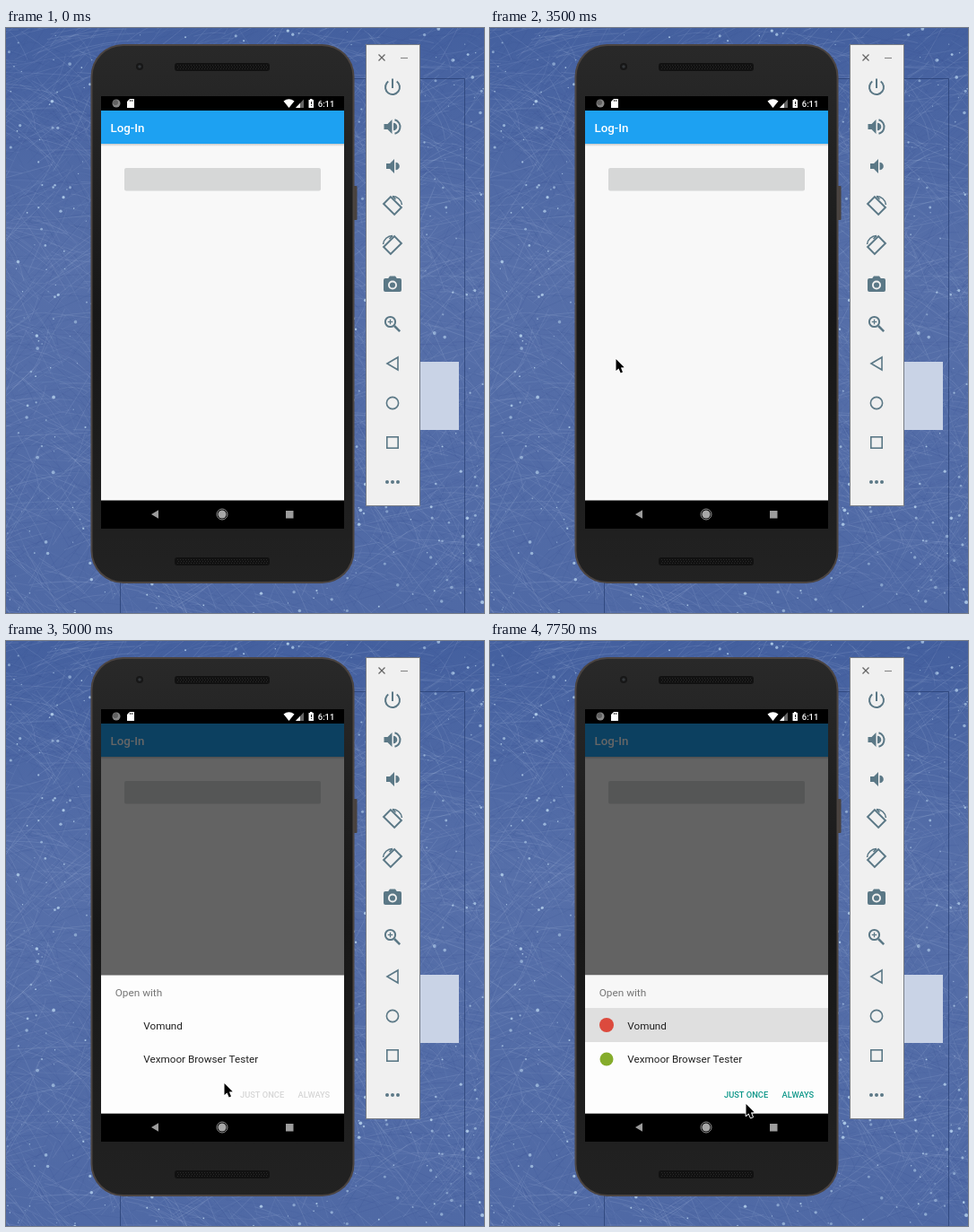
An HTML page with a canvas for the animation above (8000 ms loop, 533 by 652 pixels).

```html
<!DOCTYPE html>
<html lang="en">
<head>
<meta charset="utf-8">
<title>Log-In</title>
<style>
html, body { margin: 0; width: 100%; height: 100%; overflow: hidden; background: #5670a8; }
canvas { display: block; width: 533px; height: 652px; }
</style>
</head>
<body>
<canvas id="stage" width="533" height="652"></canvas>
<script>
const W = 533, H = 652, LOOP = 8000, TAU = Math.PI * 2;
const ctx = document.getElementById('stage').getContext('2d');
const backdrop = document.createElement('canvas');
backdrop.width = W;
backdrop.height = H;

// [start ms, x, y] of the pointer tip; it jumps from place to place
const pointerStops = [
  [500, 285, 131], [750, 250, 150], [1000, 222, 166],
  [1750, 227, 230], [2000, 238, 278], [2250, 243, 245], [2500, 238, 195], [2750, 237, 172],
  [3000, 210, 230], [3250, 160, 335], [3500, 140, 369],
  [4000, 152, 400], [4250, 168, 432], [4500, 174, 444], [4750, 408, 304], [5000, 243, 493],
  [5250, 275, 440], [5500, 225, 438], [5750, 190, 440],
  [6500, 186, 438], [6750, 180, 435], [7000, 177, 434], [7500, 200, 452], [7750, 285, 516]
];

function seeded(seed) {
  return () => {
    seed = (seed * 1664525 + 1013904223) >>> 0;
    return seed / 4294967296;
  };
}

function box(c, x, y, w, h, color) {
  c.fillStyle = color;
  c.fillRect(x, y, w, h);
}

function rounded(c, x, y, w, h, r, color) {
  c.beginPath();
  c.roundRect(x, y, w, h, r);
  c.fillStyle = color;
  c.fill();
}

function disc(c, x, y, r, color) {
  c.beginPath();
  c.arc(x, y, r, 0, TAU);
  c.fillStyle = color;
  c.fill();
}

function arc(c, x, y, r, from, to) {
  c.beginPath();
  c.arc(x, y, r, from * Math.PI, to * Math.PI);
  c.stroke();
}

function line(c, x1, y1, x2, y2) {
  c.beginPath();
  c.moveTo(x1, y1);
  c.lineTo(x2, y2);
  c.stroke();
}

function shape(c, points) {
  c.beginPath();
  points.forEach(([x, y]) => c.lineTo(x, y));
  c.closePath();
}

function fillShape(c, color, ...points) {
  shape(c, points);
  c.fillStyle = color;
  c.fill();
}

function label(c, text, x, y, size, color, weight = 400) {
  c.font = `${weight} ${size}px Roboto, sans-serif`;
  c.fillStyle = color;
  c.fillText(text, x, y);
}

function drawWallpaper(c) {
  const rnd = seeded(77);
  const base = c.createLinearGradient(0, 0, 0, H);
  base.addColorStop(0, '#44609f');
  base.addColorStop(0.4, '#566fa9');
  base.addColorStop(1, '#4f69a5');
  box(c, 0, 0, W, H, base);

  c.lineWidth = 0.7;
  for (let i = 0; i < 3600; i++) {
    const x = rnd() * (W + 80) - 80, y = rnd() * H;
    const angle = (rnd() - 0.5) * 2.4, length = 25 + rnd() * 85;
    const dx = Math.cos(angle) * length, dy = Math.sin(angle) * length;
    const alpha = 0.08 + rnd() * 0.25;
    c.strokeStyle = rnd() < 0.65 ? `rgba(155,174,211,${alpha})` : `rgba(58,82,146,${alpha})`;
    c.beginPath();
    c.moveTo(x, y);
    c.quadraticCurveTo(x + dx / 2 + rnd() * 8, y + dy / 2 - rnd() * 8, x + dx, y + dy);
    c.stroke();
  }
  for (let i = 0; i < 620; i++) {
    const x = rnd() * W, y = rnd() * H, size = 0.6 + rnd() ** 2 * 1.4;
    disc(c, x, y, size, `rgba(183,211,238,${0.5 + rnd() * 0.4})`);
  }

  box(c, 429, 372, 76, 76, '#c9d3e6');
  c.strokeStyle = 'rgba(35,57,110,.65)';
  c.lineWidth = 1;
  c.strokeRect(127.5, 56.5, 384, 700);
}

function drawSpeaker(c, y) {
  rounded(c, 188, y, 106, 9, 3, '#111');
  for (let row = 0; row < 3; row++) {
    for (let x = 191; x < 292; x += 3) box(c, x + row % 2, y + 2 + row * 2, 1, 1, '#292929');
  }
}

function drawPhone(c) {
  rounded(c, 387, 176, 4.5, 38, 1, '#49423f');
  rounded(c, 94.5, 18, 294, 601, 36, '#4b4441');
  const body = c.createLinearGradient(0, 18, 0, 619);
  body.addColorStop(0, '#292929');
  body.addColorStop(0.5, '#171717');
  body.addColorStop(1, '#222');
  rounded(c, 96.5, 20, 290, 597, 34, body);
  drawSpeaker(c, 39);
  drawSpeaker(c, 590);
  disc(c, 149, 43, 4, '#171717');
  disc(c, 149, 43, 1.8, '#34383b');

  box(c, 106, 76, 271, 482, '#000');
  disc(c, 123, 84, 4.5, '#888');
  disc(c, 122, 83, 3, '#626262');
  fillShape(c, '#fff', [135, 82], [138, 79], [143, 79], [143, 89], [135, 89]);
  [138, 140].forEach(x => box(c, x, 80, 1, 2, '#333'));

  c.beginPath();
  c.moveTo(315.5, 89);
  c.lineTo(309.5, 81.5);
  c.quadraticCurveTo(315.5, 77, 321.5, 81.5);
  c.fillStyle = '#fff';
  c.fill();
  fillShape(c, '#666', [323, 89], [332, 79.5], [332, 89]);
  fillShape(c, '#fff', [323, 89], [328, 83.7], [328, 89]);
  rounded(c, 337.5, 80, 5.5, 9, 0.5, '#fff');
  box(c, 339, 79, 2.5, 1, '#fff');
  box(c, 340, 82, 1, 3, '#222');
  box(c, 340, 86, 1, 1, '#222');
  label(c, '6:11', 347.8, 87.5, 9.4, '#fff', 500);

  fillShape(c, '#9c9c9c', [162, 542], [170, 537.3], [170, 546.7]);
  disc(c, 241, 542, 4.6, '#a7a7a7');
  c.strokeStyle = '#909090';
  c.lineWidth = 1;
  arc(c, 241, 542, 6, 0, 2);
  box(c, 312, 538, 8.5, 8.5, '#9c9c9c');
}

const slate = '#5b7886';

function speakerIcon(c, x) {
  fillShape(c, slate, [x, -3], [x + 4, -3], [x + 9, -8], [x + 9, 8], [x + 4, 3], [x, 3]);
  c.beginPath();
  c.arc(x + 10.5, 0, 4.3, -Math.PI / 2, Math.PI / 2);
  c.fill();
}

function rotateIcon(c, flip) {
  c.scale(flip, 1);
  c.save();
  c.rotate(Math.PI / 4);
  c.strokeRect(-8.5, -5.5, 17, 11);
  c.restore();
  c.lineWidth = 1.6;
  arc(c, 0, 0, 10.5, -0.5, -0.03);
  line(c, 0, -10.5, 3.5, -7);
}

const toolIcons = [
  [66, c => { arc(c, 0, 0, 8, -0.3, 1.3); line(c, 0, -9.5, 0, 1); }],
  [110, c => { speakerIcon(c, -9.5); arc(c, 0.5, 0, 8, -0.42, 0.42); }],
  [154, c => speakerIcon(c, -7)],
  [198, c => rotateIcon(c, 1)],
  [242, c => rotateIcon(c, -1)],
  [286, c => {
    rounded(c, -10, -7, 20, 15, 2, slate);
    fillShape(c, slate, [-5.5, -6], [-3, -9.5], [3, -9.5], [5.5, -6]);
    disc(c, 0, 0.5, 5, '#f0f0f0');
    disc(c, 0, 0.5, 3.1, slate);
  }],
  [330, c => {
    arc(c, -2.5, -2.5, 5.6, 0, 2);
    c.lineWidth = 2.5;
    line(c, 2, 2, 8.2, 8.2);
    c.lineWidth = 1.3;
    line(c, -5.3, -2.5, 0.3, -2.5);
    line(c, -2.5, -5.3, -2.5, 0.3);
  }],
  [374, c => { c.lineWidth = 1.6; shape(c, [[-6, 0], [6, -7], [6, 7]]); c.stroke(); }],
  [418, c => { c.lineWidth = 1.6; arc(c, 0, 0, 6.6, 0, 2); }],
  [462, c => { c.lineWidth = 1.6; c.strokeRect(-6.2, -6.2, 12.4, 12.4); }],
  [506, c => [-6, 0, 6].forEach(x => disc(c, x, 0, 2, slate))]
];

function drawToolbar(c) {
  box(c, 401, 18, 61, 515, '#777c85');
  box(c, 402, 19, 59, 513, '#f0f0f0');
  c.strokeStyle = '#666';
  c.lineWidth = 1.2;
  line(c, 415.5, 29.5, 422.5, 36.5);
  line(c, 422.5, 29.5, 415.5, 36.5);
  c.strokeStyle = '#8a8a8a';
  line(c, 440, 33.5, 448, 33.5);
  for (const [y, paint] of toolIcons) {
    c.save();
    c.translate(431, y);
    c.strokeStyle = slate;
    c.lineWidth = 2;
    paint(c);
    c.restore();
  }
}

function drawApp(t) {
  box(ctx, 106, 129, 271, 397.5, '#f8f8f8');
  const shade = ctx.createLinearGradient(0, 129, 0, 132);
  shade.addColorStop(0, 'rgba(0,0,0,.2)');
  shade.addColorStop(1, 'rgba(0,0,0,0)');
  box(ctx, 106, 129, 271, 3, shade);
  box(ctx, 106, 92, 271, 37, '#1da1f2');
  label(ctx, 'Log-In', 116.5, 115.5, 13.3, '#fff', 500);

  const pressed = t >= 2750 && t < 3000;
  ctx.save();
  if (pressed) {
    ctx.shadowColor = 'rgba(0,0,0,.4)';
    ctx.shadowBlur = 4;
    ctx.shadowOffsetY = 2;
  }
  rounded(ctx, 132, pressed ? 155 : 156, 219, pressed ? 26 : 25.5, 2, pressed ? '#d9dbda' : '#d6d7d7');
  ctx.restore();
}

function drawChooser(t) {
  box(ctx, 106, 92, 271, 434.5, `rgba(0,0,0,${t < 5000 ? 0.19 : 0.6})`);
  box(ctx, 106, 372.5, 271, 154, '#fdfdfd');
  if (t >= 7500) box(ctx, 106, 372.5, 271, 36.5, '#f7f7f7');
  if (t >= 7000) box(ctx, 106, 409, 271, 38, t < 7500 ? '#f4f4f4' : t < 7750 ? '#e6e6e6' : '#dfdfdf');
  label(ctx, 'Open with', 121.7, 395.7, 11.8, '#757575');

  if (t < 5000) {
    [428, 466].forEach(y => disc(ctx, 130, y, 8, '#e9e9e9'));
  } else {
    label(ctx, 'Vomund', 153.3, 432.7, 11.7, '#212121');
    label(ctx, 'Vexmoor Browser Tester', 153.3, 470, 11.7, '#212121');
  }
  if (t >= 5250) {
    disc(ctx, 130, 428, 8, '#dc4a3d');
    disc(ctx, 130, 466, 7.5, '#85ac2b');
  }
  const action = t >= 7500 ? '#0b9688' : '#d6d6d6';
  label(ctx, 'JUST ONCE', 261, 509, 9.3, action, 500);
  label(ctx, 'ALWAYS', 325.6, 509, 9.3, action, 500);
}

function drawPointer(t) {
  const stop = pointerStops.findLast(([start]) => start <= t);
  if (!stop) return;
  ctx.save();
  ctx.translate(stop[1] + 0.5, stop[2]);
  shape(ctx, [[0, 0], [0, 13], [3, 10.4], [5.2, 15.4], [7.5, 14.4], [5.4, 9.5], [9.2, 9.2]]);
  ctx.strokeStyle = '#fff';
  ctx.lineWidth = 1.8;
  ctx.lineJoin = 'round';
  ctx.stroke();
  ctx.fillStyle = '#000';
  ctx.fill();
  ctx.restore();
}

function render(now) {
  const t = now % LOOP;
  ctx.drawImage(backdrop, 0, 0);
  drawApp(t);
  if (t >= 4750) drawChooser(t);
  drawPointer(t);
  requestAnimationFrame(render);
}

const scene = backdrop.getContext('2d');
drawWallpaper(scene);
drawPhone(scene);
drawToolbar(scene);
requestAnimationFrame(render);
</script>
</body>
</html>
```
